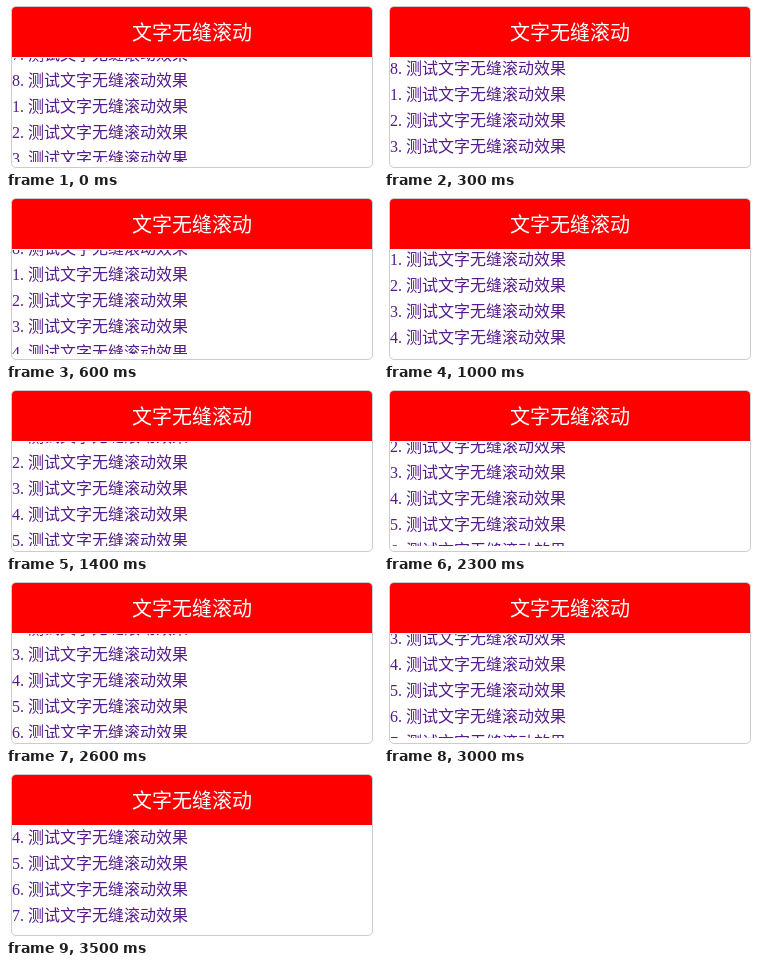
An HTML page for the animation above (3600 ms loop, 372 by 164 pixels).

```html
<!DOCTYPE html>
<html lang="zh-CN">
<head>
<meta charset="utf-8">
<style>
html, body { margin: 0; width: 100%; height: 100%; overflow: hidden; background: #fff; }
body { position: relative; font-family: "Noto Sans CJK SC", "Noto Sans CJK", sans-serif; }
.box {
  position: absolute; left: 5px; top: 0; width: 362px; height: 162px;
  box-sizing: border-box; border: 1px solid #ccc; border-radius: 5px; overflow: hidden;
}
h1 {
  margin: 0 0 1px; height: 50px; background: #f00; color: #fff;
  font-size: 20px; font-weight: 300; line-height: 49px; text-align: center;
}
.view { position: relative; height: 104px; overflow: hidden; }
#list { position: absolute; left: 0; top: -18px; }
.row {
  height: 26px; font-size: 16px; font-weight: 300; line-height: 26px;
  white-space: nowrap; color: #551a8b;
}
.num {
  display: inline-block; width: 16px; line-height: 16px;
  font-family: "Liberation Serif", serif;
}
#hand { position: absolute; left: 0; top: 0; visibility: hidden; }
</style>
</head>
<body>
<div class="box">
  <h1>文字无缝滚动</h1>
  <div class="view"><div id="list"></div></div>
</div>
<svg id="hand" width="18" height="24" viewBox="0 0 18 24" stroke="#222" stroke-linejoin="round">
  <linearGradient id="shade" x1="0" y1="0" x2=".5" y2="1">
    <stop offset=".5" stop-color="#fff"/>
    <stop offset="1" stop-color="#bbb"/>
  </linearGradient>
  <path fill="url(#shade)" d="M5.5 13V2.2a1.5 1.5 0 0 1 3 0V8a1.4 1.4 0 0 1 2.8.4a1.4 1.4 0 0 1 2.7.6a1.5 1.3 0 0 1 3 .8V15L15 18.5V22H6.5V20L1.5 13.5Q.8 11.3 2.4 11Q4 11.2 5.5 13.5Z"/>
  <path d="M8.5 8v3.5M11.3 8.4v3.1M14 9v2.5" fill="none"/>
</svg>
<script>
const LOOP = 3600, TICK = 100, ROWS = 8;
const list = document.getElementById('list');
const hand = document.getElementById('hand');

for (let i = 0; i < 10; i++) {
  const n = (i + 6) % ROWS + 1;
  list.insertAdjacentHTML('beforeend',
    `<div class="row"><span class="num">${n}.</span>测试文字无缝滚动效果</div>`);
}

// [tick, scrolled px]; the list rests while the pointer is over it
const keys = [[0, 0], [6, 24], [14, 54], [17, 66], [18, 67], [22, 67], [26, 80], [35, 115]];

function scrollAt(tick) {
  const i = Math.max(1, keys.findIndex(k => k[0] >= tick));
  const [a, from] = keys[i - 1], [b, to] = keys[i];
  return Math.round(from + (to - from) * (tick - a) / (b - a));
}

function handTop(tick) {
  if (tick === 17) return 140;
  if (tick === 22) return 137;
  return 107;
}

const start = performance.now();
function draw() {
  const tick = Math.floor((performance.now() - start) % LOOP / TICK);
  list.style.transform = `translateY(${-scrollAt(tick)}px)`;
  hand.style.visibility = tick >= 17 && tick <= 22 ? 'visible' : 'hidden';
  hand.style.transform = `translate(124px, ${handTop(tick)}px)`;
  requestAnimationFrame(draw);
}
draw();
</script>
</body>
</html>
```
